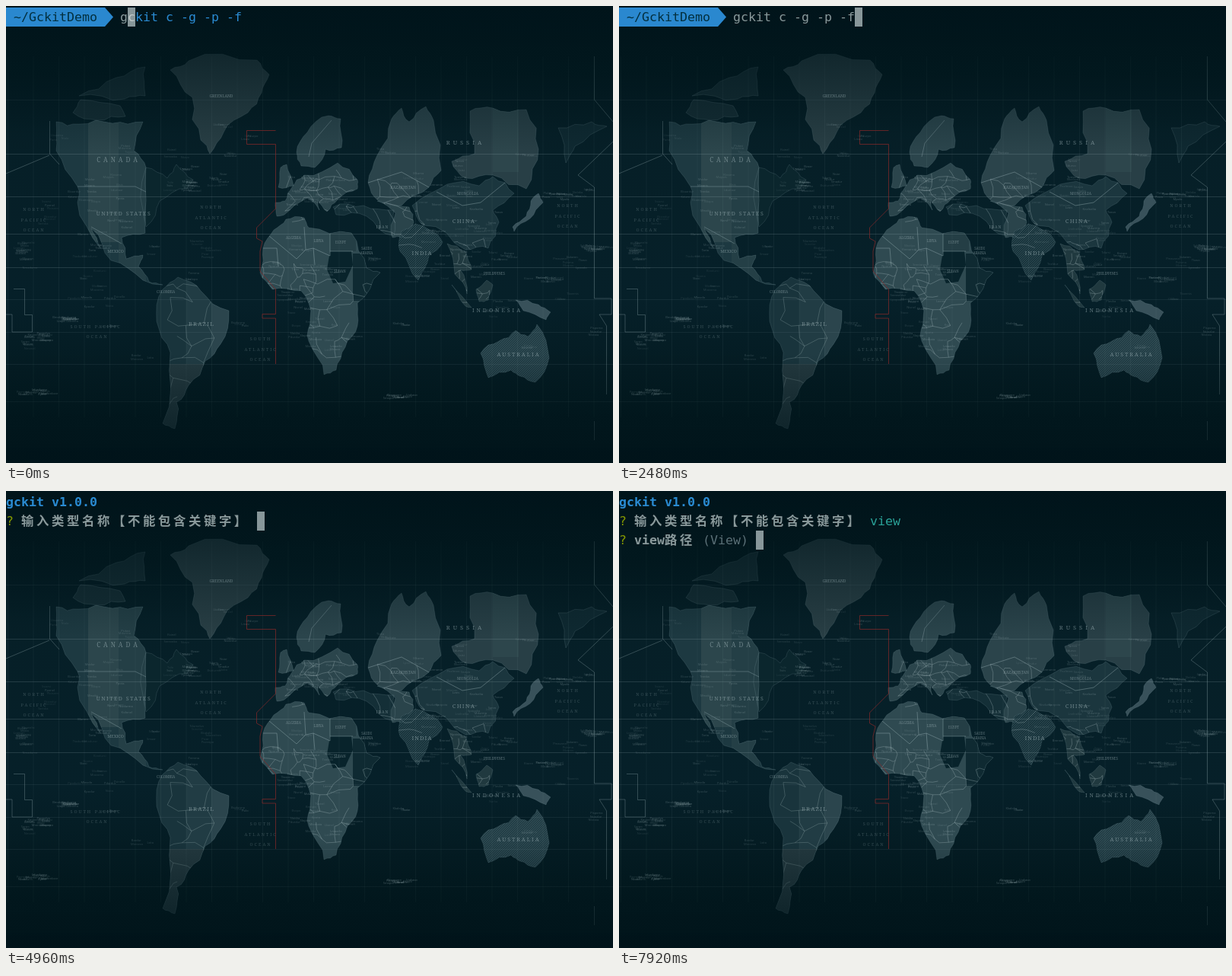
These frames come from a looping animation (798x600 px, 8000 ms). An HTML page:

```html
<!DOCTYPE html>
<html lang="en">
<head>
<meta charset="utf-8">
<title>Terminal</title>
<style>
html, body { margin: 0; width: 100%; height: 100%; overflow: hidden; background: #00131a; }
svg { display: block; width: 798px; height: 600px; }
#term text { font: 16.61px "DejaVu Sans Mono", "Liberation Mono", monospace; white-space: pre; }
#term .bold { font-weight: 700; }
#term .cjk { font: 700 16.4px "Noto Sans CJK SC", "Noto Sans CJK", "Noto Sans CJK JP", sans-serif; letter-spacing: 3.6px; }
#map text { font-family: "Noto Serif", "Liberation Serif", serif; text-anchor: middle; fill: #a4b8bc; }
#map .tiny { font: 4px "Open Sans", sans-serif; }
</style>
</head>
<body>
<svg viewBox="0 0 798 600">
  <defs>
    <linearGradient id="sea" x2="0" y2="1">
      <stop offset="0" stop-color="#001118"/>
      <stop offset=".12" stop-color="#02181e"/>
      <stop offset=".28" stop-color="#061f27"/>
      <stop offset=".65" stop-color="#062029"/>
      <stop offset=".87" stop-color="#03191f"/>
      <stop offset=".965" stop-color="#01141a"/>
      <stop offset=".975" stop-color="#001017"/>
    </linearGradient>
    <linearGradient id="shade" x2="0" y2="1">
      <stop offset=".1" stop-color="#01161c" stop-opacity=".6"/>
      <stop offset=".32" stop-color="#01161c" stop-opacity="0"/>
      <stop offset=".76" stop-color="#01161c" stop-opacity="0"/>
      <stop offset=".93" stop-color="#01161c" stop-opacity=".6"/>
    </linearGradient>
    <pattern id="hatch" width="3" height="3" patternUnits="userSpaceOnUse">
      <path d="M0 3L3 0" stroke="#56737a" stroke-width=".7" opacity=".55"/>
    </pattern>
    <clipPath id="landClip"></clipPath>
  </defs>
  <rect width="798" height="600" fill="url(#sea)"/>
  <g id="map"></g>
  <g id="term"></g>
</svg>
<script>
const byId = id => document.getElementById(id);
const INK = '#9fb5ba';
let seed = 7;
const rnd = () => (seed = seed * 16807 % 2147483647) / 2147483647;
const jitter = size => (rnd() - .5) * size;
const pick = list => list[Math.floor(rnd() * list.length)];

// Roughen an outline by shifting the middle of each side
function coast(points, depth = 2) {
  if (!depth) return points;
  const out = [];
  points.forEach(([x, y], i) => {
    const [u, v] = points[(i + 1) % points.length];
    const k = jitter(.24);
    out.push([x, y], [(x + u) / 2 + (v - y) * k, (y + v) / 2 - (u - x) * k]);
  });
  return coast(out, depth - 1);
}

let shapes = '', outlines = '', details = '';
function land(fill, text, hatched) {
  const points = text.split(' ').map(p => p.split(',').map(Number));
  const d = 'M' + coast(points).map(p => p.map(n => n.toFixed(1))).join('L') + 'Z';
  shapes += `<path d="${d}" fill="${fill}"/>`;
  if (hatched) shapes += `<path d="${d}" fill="url(#hatch)"/>`;
  outlines += d;
}
const band = (x, y, w, h, fill) => details += `<rect x="${x}" y="${y}" width="${w}" height="${h}" fill="${fill}"/>`;
const line = (d, opacity, stroke = INK, width = 1) =>
  `<path d="${d}" fill="none" stroke="${stroke}" stroke-opacity="${opacity}" stroke-width="${width}"/>`;

// Country borders: a jittered net, later cut to the land
function net(x, y, w, h, step, opacity) {
  const cols = Math.ceil(w / step), rows = Math.ceil(h / step);
  const node = [];
  for (let r = 0; r <= rows; r++)
    for (let c = 0; c <= cols; c++)
      node.push([x + c * step + (r % 2) * step / 2 + jitter(step * .7), y + r * step + jitter(step * .7)]);
  let d = '';
  const join = (a, b) => {
    const mx = (a[0] + b[0]) / 2 + jitter(step * .35), my = (a[1] + b[1]) / 2 + jitter(step * .35);
    d += `M${a}L${mx} ${my} ${b}`;
  };
  node.forEach((a, i) => {
    if ((i + 1) % (cols + 1) && rnd() < .7) join(a, node[i + 1]);
    if (node[i + cols + 1] && rnd() < .8) join(a, node[i + cols + 1]);
  });
  details += line(d, opacity, '#b4c7ca', .8);
}

function drawLand() {
  // Americas
  land('#1d3941', '66,152 96,155 140,154 180,152 168,190 184,212 183,298 152,304 158,332 180,327 174,342 188,362 206,366 180,360 138,334 112,292 124,318 94,258 94,237 66,190');
  land('#152d34', '88,140 98,123 150,131 157,145 120,150');
  land('#152d34', '96,118 145,94 183,80 183,118 156,122');
  land('#0b262d', '184,212 212,226 224,208 246,228 238,240 202,256 184,290');
  land('#293f45', '216,84 240,72 330,71 346,90 336,114 318,140 286,166 268,194 256,176 245,120');
  land('#19343c', '206,372 226,356 256,374 293,400 282,444 262,466 240,498 224,520 222,555 206,548 216,455 198,414');
  // Europe and Africa
  land('#2f4a51', '368,280 392,278 398,291 454,298 474,344 492,350 462,390 462,420 446,448 434,478 418,484 398,440 400,410 388,374 350,372 334,350 338,318 352,294');
  land('#2b454c', '354,258 367,256 376,238 392,222 436,206 462,228 462,240 436,254 422,270 410,255 412,268 396,252 366,274 356,276');
  land('#2b454c', '388,210 382,192 396,166 424,144 440,148 441,186 420,188 406,212');
  land('#2b454c', '358,238 361,212 369,208 378,236');
  land('#142f37', '430,264 470,262 510,268 510,302 474,276 434,274');
  // Asia
  land('#2b444b', '488,196 507,148 520,134 530,152 552,132 562,150 572,216 556,238 520,262 490,256 476,232');
  land('#283f46', '610,138 640,134 684,136 700,188 684,240 640,222 604,226 586,204 616,194');
  land('#0f2931', '726,160 770,152 790,158 748,184 736,206');
  land('#1b363e', '534,262 580,234 622,236 640,224 668,246 640,268 648,284 634,318 604,320 548,288');
  land('#2a444b', '488,256 530,264 536,284 520,304 508,304 512,272');
  land('#17323a', '520,296 538,286 574,310 556,328 542,360 518,322', true);
  land('#20393f', '580,312 604,322 612,346 597,346 606,378 590,352');
  land('#20393f', '586,366 612,396 604,394');
  land('#20393f', '618,372 632,360 640,366 634,386 622,388');
  land('#38515a', '670,386 700,392 716,402 710,412 680,400');
  land('#38515a', '690,256 700,246 706,258 689,279 668,296 666,290 684,276');
  land('#213c44', '624,456 648,440 670,426 686,434 698,418 714,462 696,494 676,486 664,478 634,488', true);

  // Time zones
  band(108, 150, 40, 160, '#2c464c');
  band(148, 150, 36, 216, '#243f46');
  band(237, 360, 33, 110, '#213c44');
  band(270, 380, 26, 80, '#2b454d');
  band(203, 470, 60, 90, '#24393f');
  band(456, 325, 40, 62, '#0f2a32');
  band(426, 290, 34, 32, '#243e45');
  band(640, 128, 34, 90, '#2d464c');
  details += '<path d="M426 322H454L456 340 446 362 430 364 422 346Z" fill="#08232b"/>';

  net(335, 340, 60, 36, 13, .36);
  net(390, 360, 80, 95, 19, .38);
  net(370, 214, 90, 56, 13, .36);
  net(205, 362, 45, 150, 26, .3);
  net(485, 230, 50, 70, 17, .36);
  net(578, 310, 40, 70, 13, .36);
  details += line('M94 237H170L184 244M112 290L134 302 152 312M398 198L402 180 428 150', .35);
  details += line('M346 302L382 332 394 320 392 290M394 320L404 318 426 328V290M426 322H456M338 318H356L358 342M404 318L406 340', .4);
  details += line('M566 244L600 262 624 258 656 232M476 232L520 218 556 238', .4);
}

// Fine lettering
const label = (s, x, y, size = 4.5, gap = 0, alpha = .55) =>
  `<text x="${x}" y="${y}" font-size="${size}" letter-spacing="${gap}" opacity="${alpha}">${s}</text>`;
const ocean = (side, name, x, y) => [side, name, 'OCEAN'].map((s, i) => label(s, x, y + i * 13.5, 5.5, 2, .3)).join('');
const syllables = ['ma', 'lo', 'ren', 'ta', 'si', 'vo', 'nel', 'ka', 'dur', 'is', 'po', 'ar'];
const word = () => pick('MPTLSKBN') + pick(syllables) + pick(syllables) + (rnd() < .5 ? pick(syllables) : '');
function words(x, y, w, h, count, alpha = .3) {
  let out = '';
  for (let i = 0; i < count; i++)
    out += `<text class="tiny" x="${(x + jitter(w)).toFixed(1)}" y="${(y + jitter(h)).toFixed(1)}" opacity="${(alpha + jitter(.2)).toFixed(2)}">${word()}</text>`;
  return out;
}

function lettering() {
  let out = label('CANADA', 148, 205, 8, 4) + label('UNITED STATES', 155, 275, 7, 1.5) +
    label('BRAZIL', 257, 420, 7.5, 1.2) + label('CHINA', 602, 285, 7.5, 1.2) +
    label('RUSSIA', 604, 182, 7.5, 4) + label('INDIA', 547, 327, 7.5, 1) +
    label('INDONESIA', 646, 402, 7, 3) + label('AUSTRALIA', 674, 460, 7, 2) +
    label('MEXICO', 144, 324, 5.5) + label('KAZAKHSTAN', 522, 240, 5) +
    label('MONGOLIA', 607, 248, 5) + label('GREENLAND', 283, 120, 5) +
    label('ALGERIA', 378, 306) + label('LIBYA', 411, 310) + label('EGYPT', 440, 312) +
    label('SUDAN', 439, 350) + label('SAUDI', 474, 320) + label('ARABIA', 474, 326) +
    label('IRAN', 495, 292, 5, 1) + label('PHILIPPINES', 642, 353) + label('COLOMBIA', 210, 377);
  out += ocean('NORTH', 'ATLANTIC', 270, 266) + ocean('NORTH', 'PACIFIC', 37, 269) +
    ocean('NORTH', 'PACIFIC', 739, 264) + ocean('SOUTH', 'ATLANTIC', 335, 439) +
    label('SOUTH PACIFIC', 118, 423, 5.5, 2, .3) + label('OCEAN', 120, 436, 5.5, 2, .3);
  // Dense groups, then loose ones over the rest
  out += words(243, 228, 14, 34, 14) + words(78, 412, 18, 9, 7) + words(38, 437, 36, 12, 12) +
    words(733, 251, 48, 8, 12) + words(705, 360, 45, 6, 10) + words(774, 320, 36, 8, 12) +
    words(18, 325, 16, 14, 6) + words(42, 508, 44, 9, 12) + words(520, 513, 44, 5, 8) +
    words(410, 245, 70, 40, 24) + words(405, 400, 60, 110, 26) + words(130, 270, 60, 100, 20) +
    words(600, 300, 100, 130, 36);
  for (let i = 0; i < 60; i++) out += words(15 + rnd() * 768, 150 + rnd() * 310, 24, 14, 3, .24);
  return out;
}

function drawMap() {
  drawLand();
  byId('landClip').innerHTML = `<path d="${outlines}"/>`;
  let out = shapes + `<g clip-path="url(#landClip)">${details}</g>` + line(outlines, .22, INK, .7);
  for (let x = 773; x > 0; x -= 33.5) out += line(`M${x} 66V540`, .09, INK, .8);
  for (const y of [123, 385, 428, 470, 519]) out += line(`M0 ${y}.5H798`, .09);
  for (const y of [194, 250, 299, 343]) out += line(`M0 ${y}.5H798`, .19);
  out += line('M773.5 66V123L798 152M798 178L752 222 773.5 238V384H796V405H780L789.5 420V510M773.5 545V570', .3);
  out += line('M57.5 151V194L70 208M0 220L57 196M10 371.5H24.5V405.5H34.5V428H8V405H0', .3);
  out += '<rect width="798" height="600" fill="url(#shade)"/>';
  out += line('M354.5 163.5H316.5V181.5H354.5V266L329.5 291V305L337 309 334 322V348L354.5 372V404.5H337V410H354.5V470', .7, '#8b2828');
  byId('map').innerHTML = out + lettering();
}

// Terminal: cells are 10 by 25
const GREY = '#8a999b', BLUE = '#2a8bd2', GREEN = '#859900', CYAN = '#2aa198', DIM = '#5a6f76';
const put = (col, row, s, fill, cls = '') =>
  `<text x="${col * 10}" y="${row * 25 + 20}" fill="${fill}" class="${cls}">${s}</text>`;
const cursor = (col, row) =>
  `<rect x="${col * 10}" y="${row * 25 + 2}" width="10" height="25" fill="#88979a"/>`;

const command = 'gckit c -g -p -f';
const prompt = n => '<path d="M0 2H130L141 14.5 130 27H0Z" fill="#2a88cf"/>' +
  put(1, 0, '~/GckitDemo', '#03303f') + cursor(15 + n, 0) + put(15, 0, command.slice(0, n), GREY) +
  put(15 + n, 0, command.slice(n, n + 1), '#c4cccc') + put(16 + n, 0, command.slice(n + 1), BLUE);

const question = (answer, fill) =>
  put(0, 0, 'gckit v1.0.0', BLUE, 'bold') + put(0, 1, '?', GREEN) +
  put(2, 1, '输入类型名称【不能包含关键字】', GREY, 'cjk') + put(33, 1, answer, fill);
const asking = s => question(s, GREY) + cursor(33 + s.length, 1);
const answered = () => question('view', CYAN) + put(0, 2, '?', GREEN) +
  put(2, 2, 'view', GREY, 'bold') + put(6, 2, '路径', GREY, 'cjk') +
  put(11, 2, '(View)', DIM) + cursor(18, 2);
const scrollbar = '<rect x="796" y="69" width="4" height="540" rx="2" fill="#6c7b7e"/>';

// Start time in ms and screen content
const screens = [
  [0, prompt(1)], [640, prompt(2)], [1360, prompt(3)], [2400, prompt(16)],
  [3920, asking('') + scrollbar], [4960, asking('')],
  [5680, asking('v')], [6080, asking('vi')], [6320, asking('vie')], [6640, asking('view')],
  [7440, answered()]
];

let shown = -1;
function render(t) {
  const i = screens.findLastIndex(([start]) => start <= t);
  if (i === shown) return;
  shown = i;
  byId('term').innerHTML = screens[i][1];
}

drawMap();
render(0);
const begin = performance.now();
function tick() {
  render((performance.now() - begin) % 8000);
  requestAnimationFrame(tick);
}
requestAnimationFrame(tick);
</script>
</body>
</html>
```
